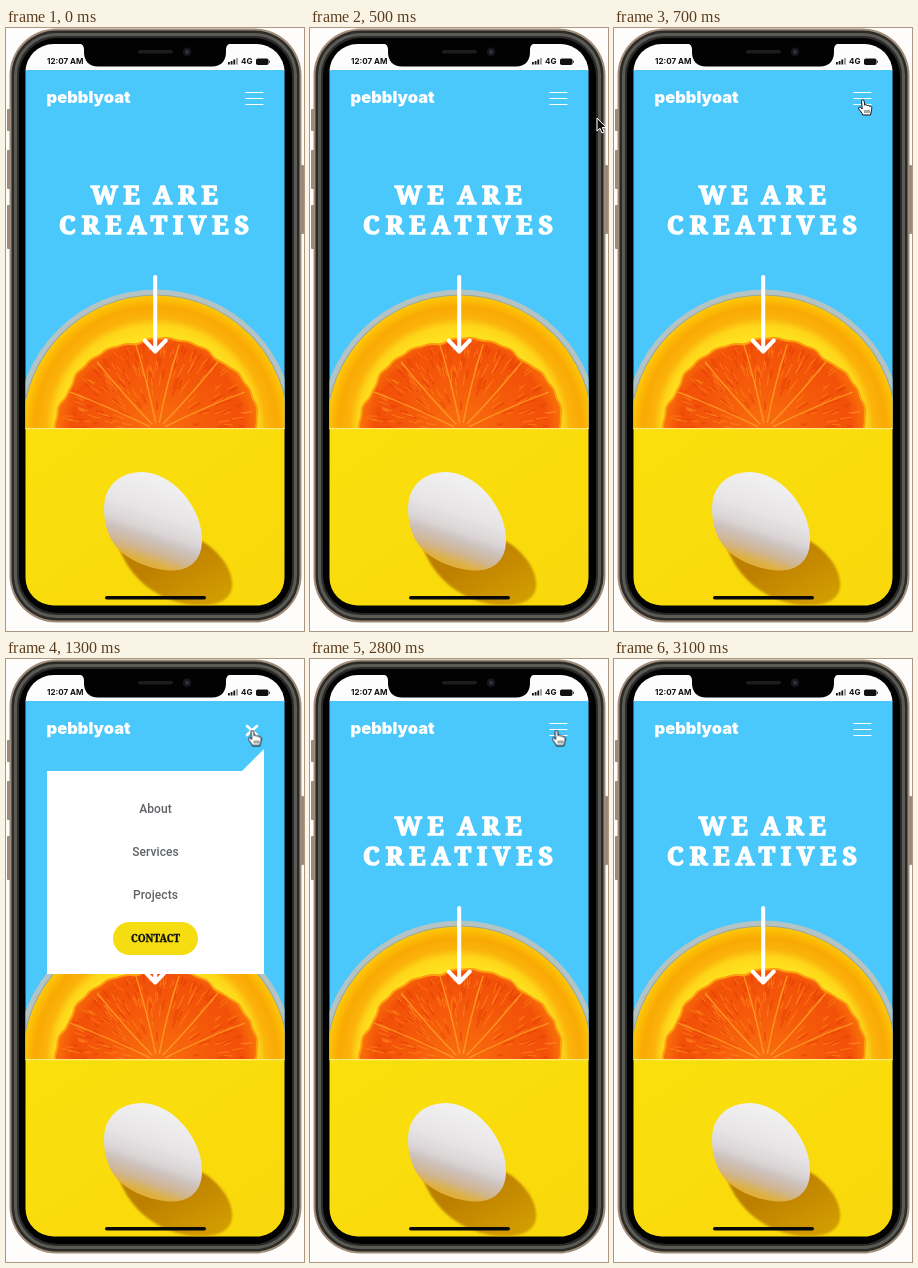
Write an HTML page that moves like this. It is 298 by 603 pixels and loops after 4200 ms.

```html
<!DOCTYPE html>
<html lang="en">
<head>
<meta charset="utf-8">
<title>Mobile menu</title>
<style>
  html, body { margin: 0; width: 100%; height: 100%; overflow: hidden; background: #fffcfc; }
  svg { display: block; width: 100vw; height: 100vh; }
  .status { font: 700 8px Inter, sans-serif; fill: #111; }
  .brand { font: 900 16.5px Inter, sans-serif; fill: #fff; }
  .title { font: 900 25px "Noto Serif", serif; letter-spacing: 5.9px; word-spacing: -5px; fill: #fff;
    stroke: #fff; stroke-width: 1.5; text-anchor: middle; }
  .link { font: 500 12px Roboto, sans-serif; letter-spacing: .1px; fill: #5f6367; text-anchor: middle; }
  .cta { font: 900 10px "Noto Serif", serif; fill: #111; stroke: #111; stroke-width: .3; text-anchor: middle; }
  .line { fill: none; stroke: #fff; stroke-linecap: round; stroke-linejoin: round; }

  .menu, .burger, .arrow, .hand { animation: 4200ms step-end infinite; }
  .menu { animation-name: open; }
  .burger { animation-name: closed; }
  .arrow { animation-name: arrow; }
  .hand { animation-name: hand; }
  @keyframes open {
    0% { visibility: hidden; }
    30.95% { visibility: visible; }
    66.66%, 100% { visibility: hidden; }
  }
  @keyframes closed {
    0% { visibility: visible; }
    30.95% { visibility: hidden; }
    66.66%, 100% { visibility: visible; }
  }
  @keyframes arrow {
    0% { visibility: hidden; transform: translate(287px, 90px); }
    11.9% { visibility: visible; transform: translate(287px, 90px); }
    14.28% { visibility: visible; transform: translate(266px, 80px); }
    16.66%, 100% { visibility: hidden; transform: translate(266px, 80px); }
  }
  @keyframes hand {
    0% { visibility: hidden; transform: translate(249px, 72px); }
    16.66% { visibility: visible; transform: translate(249px, 72px); }
    21.42% { visibility: visible; transform: translate(246.5px, 71.5px); }
    73.8%, 100% { visibility: hidden; transform: translate(246.5px, 71.5px); }
  }
</style>
</head>
<body>
<svg viewBox="0 0 298 603" preserveAspectRatio="none">
  <defs>
    <clipPath id="screen"><rect x="19.5" y="16" width="259" height="561.5" rx="28"/></clipPath>
    <clipPath id="upper"><rect x="19" y="42" width="260" height="358.5"/></clipPath>
    <filter id="soft"><feGaussianBlur stdDeviation="1.2"/></filter>
    <filter id="fuzz"><feGaussianBlur stdDeviation=".5"/></filter>
    <radialGradient id="peel" gradientUnits="userSpaceOnUse" cx="150" cy="400" r="133">
      <stop offset=".7" stop-color="#ffe01e"/>
      <stop offset=".77" stop-color="#fed61a"/>
      <stop offset=".83" stop-color="#fbb30a"/>
      <stop offset=".91" stop-color="#f9a904"/>
      <stop offset=".96" stop-color="#fcba04"/>
      <stop offset="1" stop-color="#fdca08"/>
    </radialGradient>
    <radialGradient id="flesh" gradientUnits="userSpaceOnUse" cx="151" cy="402" r="101">
      <stop offset="0" stop-color="#f9700f"/>
      <stop offset=".5" stop-color="#f55a0a"/>
      <stop offset=".85" stop-color="#f25008"/>
      <stop offset="1" stop-color="#f9720a"/>
    </radialGradient>
    <linearGradient id="floor" x2="1" y2="1">
      <stop offset="0" stop-color="#fae00d"/>
      <stop offset="1" stop-color="#f9d80b"/>
    </linearGradient>
    <linearGradient id="shade" x2="1" y2="1">
      <stop offset=".35" stop-color="#bd7f04"/>
      <stop offset="1" stop-color="#d6a206"/>
    </linearGradient>
    <linearGradient id="egg" gradientUnits="userSpaceOnUse" x1="160" y1="454" x2="133" y2="531">
      <stop offset="0" stop-color="#f1f0f0"/>
      <stop offset=".4" stop-color="#e7e4e5"/>
      <stop offset=".62" stop-color="#dad4d5"/>
      <stop offset=".72" stop-color="#cdc2bd"/>
      <stop offset=".87" stop-color="#d0b592"/>
      <stop offset="1" stop-color="#dfb040"/>
    </linearGradient>
  </defs>

  <rect width="298" height="603" fill="#fffcfc"/>

  <!-- phone body -->
  <g fill="#9a8a7a">
    <rect x="1" y="81" width="4" height="22" rx="1"/>
    <rect x="1" y="122" width="4" height="39" rx="1"/>
    <rect x="1" y="177" width="4" height="44" rx="1"/>
    <rect x="294" y="137" width="4" height="69" rx="1"/>
  </g>
  <rect x="3.5" y=".5" width="292" height="594" rx="47" fill="#9f8c78"/>
  <rect x="5.500" y="2.500" width="288" height="590" rx="45" fill="#2b2a28"/>
  <rect x="9.500" y="6.500" width="280" height="582" rx="41" fill="none" stroke="#5b5b56" stroke-width="3"/>
  <rect x="13" y="10" width="273" height="575" rx="38" fill="#020202"/>

  <g clip-path="url(#screen)">
    <rect x="19" y="16" width="260" height="27" fill="#fdfdfd"/>
    <rect x="19" y="42" width="260" height="359" fill="#4ac8fb"/>

    <!-- fruit in its glass -->
    <g clip-path="url(#upper)">
      <circle cx="149.500" cy="400" r="138.500" fill="#b3c3c6"/>
      <circle cx="149.500" cy="400" r="133.500" fill="#98a69e"/>
      <circle cx="149.500" cy="400" r="132.500" fill="url(#peel)"/>
      <path id="rind" fill="url(#flesh)" stroke="#ff9c10" stroke-width="2" filter="url(#fuzz)"/>
      <path id="dark" fill="none" stroke="#e43e05" stroke-width="2" opacity=".5"/>
      <path id="light" fill="none" stroke="#ff8d1c" opacity=".65"/>
      <path id="walls" fill="none" stroke="#ff9c22" stroke-width="1.500" opacity=".85" filter="url(#fuzz)"/>
    </g>

    <!-- egg -->
    <rect x="19" y="400" width="260" height="178" fill="url(#floor)"/>
    <rect x="19" y="400" width="260" height="1.200" fill="#fdec7c"/>
    <path d="M113 520C124 550 152 574 188 577C215 579 228 570 226 553C224 537 210 520 192 511Z" fill="url(#shade)" filter="url(#soft)"/>
    <path d="M98 480C98 458 114 444 136 444C165 444 196 478 196 512C196 532 184 543 164 542.500C150 542 128 536 113 522C102 511 98 495 98 480Z" fill="url(#egg)"/>

    <text class="brand" x="40.500" y="75">pebblyoat</text>
    <text class="title" x="151.400" y="176">WE ARE</text>
    <text class="title" x="151" y="206">CREATIVES</text>
    <path class="line" stroke-width="4" d="M149.200 249V323M138.700 312.500L149.200 323.500L159.700 312.500"/>
    <path class="line burger" stroke-width="1.200" stroke-linecap="butt" d="M240 64.500H257M240 70.500H257M240 76.500H257"/>

    <g class="menu">
      <path class="line" stroke-width="2.600" stroke-linecap="butt" d="M241 67L251 76M251 67L241 76"/>
      <path fill="#fff" d="M41 112H236L258 90V315H41Z"/>
      <text class="link" x="149.500" y="154">About</text>
      <text class="link" x="149.500" y="197">Services</text>
      <text class="link" x="149.500" y="240">Projects</text>
      <rect x="107" y="263" width="85" height="33" rx="16.500" fill="#f5dd12"/>
      <text class="cta" x="149.500" y="283">CONTACT</text>
    </g>

    <rect x="99" y="568" width="101" height="3.500" rx="1.750" fill="#080808"/>

    <!-- status bar -->
    <text class="status" x="41" y="36">12:07 AM</text>
    <text class="status" x="235" y="36">4G</text>
    <path fill="#111" d="M222 34h1.800v2.500h-1.800zM224.700 33h1.800v3.500h-1.800zM227.400 31.500h1.800v5h-1.800z"/>
    <path fill="#999" d="M230.100 30h1.800v6.500h-1.800z"/>
    <rect x="250" y="30.500" width="12.500" height="6.500" rx="1.800" fill="#111"/>
    <rect x="263" y="32.500" width="1" height="2.500" rx=".5" fill="#555"/>
  </g>

  <path fill="#020202" d="M73 15C76 16 78 18 78 21V24C78 33 83 38.500 92 38.500H206C215 38.500 220 33 220 24V21C220 18 222 16 225 15Z"/>
  <rect x="132" y="22" width="35" height="3.500" rx="1.750" fill="#1d1d1e"/>
  <circle cx="181" cy="23.800" r="4.300" fill="#17181c"/>
  <circle cx="181" cy="23.800" r="1.700" fill="#34364a"/>

  <!-- pointers -->
  <g class="arrow">
    <path d="M0 0V13L3 10.300L5 15L7.300 14L5.300 9.500H9.300Z" fill="#111" stroke="#fff"/>
  </g>
  <g class="hand">
    <path d="M-1.500 1.200C-1.500 -.6 1 -.6 1.200 1.200L1.700 5.200C2.500 4.400 4 4.600 4.200 5.700C5 5 6.400 5.300 6.600 6.400C7.600 5.900 8.800 6.500 8.800 7.800C8.800 10.800 8 12 7.500 15H-.3C-.8 13 -2.800 11 -4.200 9C-5.200 7.300 -3.300 6.500 -2 7.800L-.8 9Z" fill="#fff" stroke="#111" stroke-linejoin="round"/>
    <path d="M2 10V13M4 10V13M6 10V13" stroke="#222" stroke-width=".8"/>
  </g>
</svg>
<script>
  let seed = 11;
  const rand = () => (seed = seed * 16807 % 2147483647) / 2147483647;
  const at = (angle, k) =>
    `${(151.5 + 102 * k * Math.cos(angle)).toFixed(1)} ${(402 - 92 * k * Math.sin(angle)).toFixed(1)}`;
  const put = (id, d) => document.getElementById(id).setAttribute("d", d);

  // scalloped edge, dipping where two segments meet
  const SEGMENTS = 7;
  const edge = a => 1 - 0.04 * Math.abs(Math.cos(a * SEGMENTS / 2)) ** 10 + 0.006 * Math.sin(a * 31);
  let rind = "";
  for (let i = 0; i <= 120; i++) {
    const a = -0.1 + i / 120 * (Math.PI + 0.2);
    rind += (i ? "L" : "M") + at(a, edge(a));
  }
  put("rind", rind + "Z");

  let walls = "";
  for (let i = 1; i < SEGMENTS; i++) {
    const a = i * Math.PI / SEGMENTS;
    const bend = i % 2 ? 0.05 : -0.04;
    walls += `M${at(a, 0.08)}Q${at(a + bend, 0.5)} ${at(a, 0.95)}`;
  }
  put("walls", walls);

  const pulp = count => {
    let d = "";
    for (let i = 0; i < count; i++) {
      const a = rand() * Math.PI;
      const k = 0.2 + 0.68 * Math.sqrt(rand());
      d += `M${at(a, k)}L${at(a + (rand() - 0.5) * 0.04, Math.min(k + 0.05 + rand() * 0.08, 0.95))}`;
    }
    return d;
  };
  put("dark", pulp(80));
  put("light", pulp(120));
</script>
</body>
</html>
```
